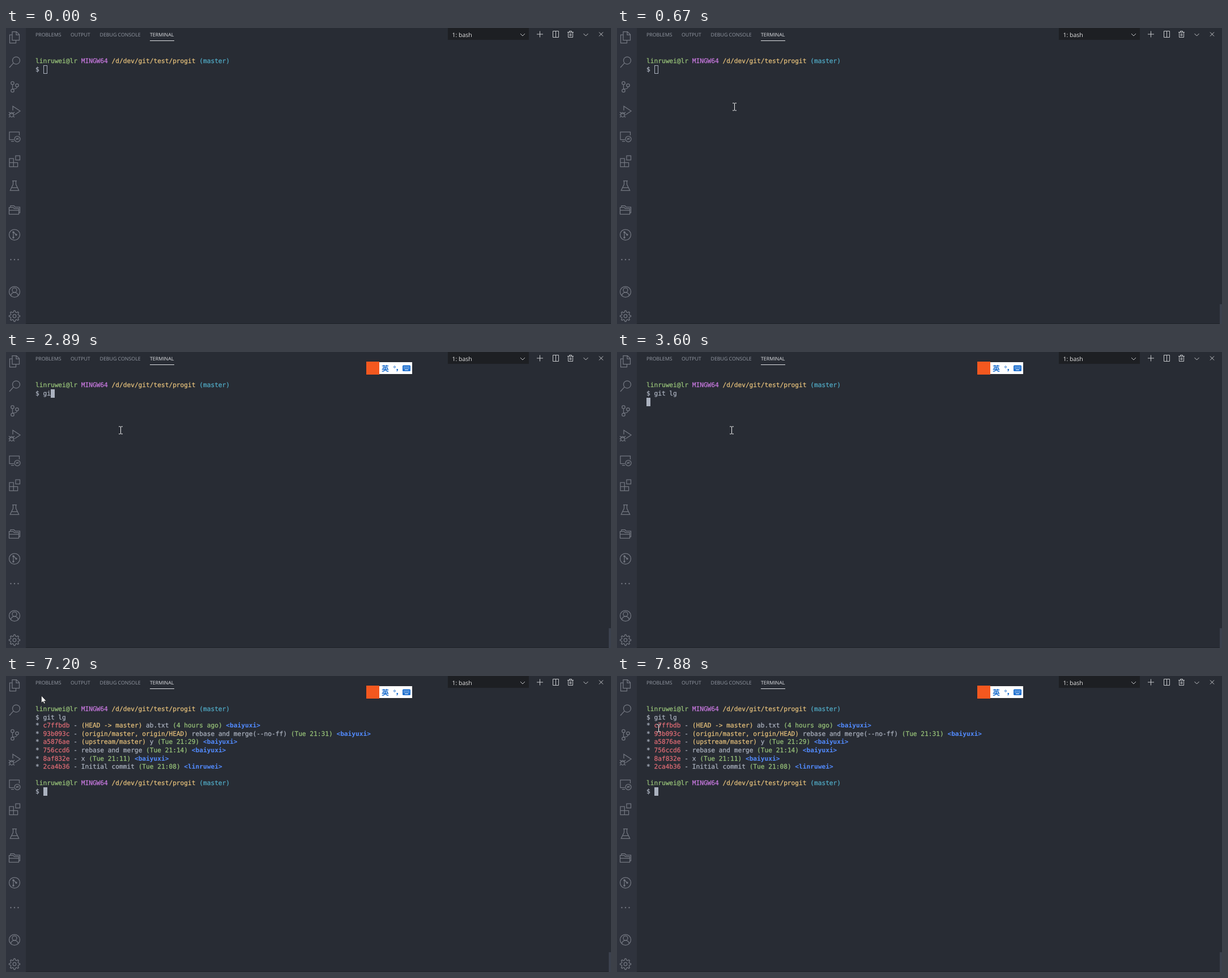
These frames come from a looping animation (1068 by 524 pixels, 8000 ms). An HTML page:

```html
<!DOCTYPE html>
<html lang="en">
<head>
<meta charset="utf-8">
<title>Terminal</title>
<style>
  html, body { margin: 0; width: 100%; height: 100%; overflow: hidden; background: #282c34; }
  svg { display: block; }
  text { white-space: pre; text-rendering: geometricPrecision; }
  .ui { font: 8.8px "Open Sans", sans-serif; fill: #949aa4; }
  .mono { font: 11.18px "DejaVu Sans Mono", monospace; color: #abb2bf; }
  .mono text, .mono tspan { fill: currentColor; stroke: currentColor; stroke-width: .25; }
  .mono .green { color: #98c379; }
  .mono .magenta { color: #c678dd; }
  .mono .yellow { color: #e5c07b; }
  .mono .cyan { color: #52adc8; }
  .mono .red { color: #e06c75; }
  .mono .blue { color: #528bff; font-weight: bold; stroke: none; }
  .line { fill: none; stroke-width: 1.25; }
  .thin { fill: none; stroke-width: 1; }
</style>
</head>
<body>
<svg width="1068" height="524" viewBox="0 0 1068 524">
  <rect width="1068" height="524" fill="#282c34"/>
  <rect width="35" height="524" fill="#2f333d"/>
  <rect x="35" y="523" width="1033" height="1" fill="#21252b"/>

  <g class="line" stroke="#737781">
    <path d="M11 6.5h7.5l5 5v10H11zM18 7v5h5M11 12H6.5v14.5h11v-5"/>
    <path d="M13.3 61.8L6 70"/><circle cx="18" cy="57.5" r="6.5"/>
    <path d="M11.5 100.2v8.1M19.5 104.2c0 3.2-3 3.5-8 4"/>
    <circle cx="11.5" cy="97.5" r="2.7"/><circle cx="11.5" cy="111" r="2.7"/><circle cx="19.5" cy="101.5" r="2.7"/>
    <path d="M12 146v-7.5l13 8.5-9 6M5 149l2.5 2M15 149l-2.5 2M4.5 153.5h2M13.5 153.5h2M5 158l2.5-2M15 158l-2.5-2M7 151.5h6"/>
    <ellipse cx="10" cy="153.5" rx="3.3" ry="4"/>
    <path d="M14 197.5H6V184h17.5v6M9 200.5h5M18 195l1.5 1.5-1.5 1.5M22 194.5l-1.5 1.5 1.5 1.5"/>
    <circle cx="20" cy="196.5" r="5"/>
    <path d="M6 231h7.3v7.3h7.3v7.2H6zM6 238.3h7.3v7.2M17 226h7.5v7.5H17z"/>
    <path d="M11 270.5h8M12.5 271v6L7.3 287.5h15.4L17.5 277v-6M10 282.5h10"/>
    <path d="M5.5 329.5v-12h7l2 2h8v10zM8 317v-2.5h6l2 2.5h8.5v10h-2M5.5 322.5h17"/>
    <circle cx="15" cy="366" r="9.5"/><path d="M13 361v10M13 361l5 5"/>
    <circle cx="15" cy="467" r="9.5"/><circle cx="15" cy="464" r="4"/>
    <path d="M8.5 473.5c1-4 3.5-5.5 6.5-5.5s5.5 1.5 6.5 5.5"/>
    <path id="gear"/><circle cx="15" cy="510" r="2.8"/>
  </g>
  <g fill="#737781">
    <circle cx="13" cy="361.5" r="1.7"/><circle cx="13" cy="371" r="1.7"/><circle cx="18" cy="366" r="1.7"/>
    <circle cx="8.5" cy="410" r="1.2"/><circle cx="15" cy="410" r="1.2"/><circle cx="21.5" cy="410" r="1.2"/>
  </g>

  <g class="ui">
    <text x="52" y="15">PROBLEMS</text>
    <text x="114" y="15">OUTPUT</text>
    <text x="165.5" y="15">DEBUG CONSOLE</text>
    <text x="254" y="15" fill="#e0e2e6">TERMINAL</text>
  </g>
  <rect x="254" y="22" width="43" height="1" fill="#e0e2e6"/>
  <rect x="780" width="143" height="21" fill="#1d1f23"/>
  <text x="787.5" y="16" style="font: 10.5px 'Open Sans', sans-serif" fill="#e4e4e4">1: bash</text>
  <g class="thin" stroke="#c5c7ca">
    <path d="M908 10l4 4 4-4M1019.5 10l4 4 4-4M942.5 5.5v11M937 11h11M1047 7.5l7 7M1054 7.5l-7 7"/>
    <path d="M965.5 5.5h10v11h-10zM970.5 5.5v11M991 7.5h11M994.5 7V5.500h4V7M992.5 8v8.5h8V8M995.5 9.5v5M997.5 9.5v5"/>
  </g>
  <rect id="scrollbar" x="1064" y="489" width="4" height="35" fill="#3b414d"/>

  <g class="mono" id="screen">
    <rect id="block" width="6" height="14" stroke="#abb2bf"/>
    <text id="typed"></text>
    <g id="output"></g>
  </g>

  <g id="ime">
    <rect x="648" y="18" width="69" height="21" fill="#fff"/>
    <rect x="636" y="17" width="23" height="23" fill="#f4581f"/>
    <text x="663" y="33.5" style="font: bold 13px 'Noto Sans CJK SC', 'Noto Sans CJK', sans-serif" fill="#1d6fcf">英</text>
    <circle cx="686" cy="26.5" r="1.5" fill="none" stroke="#1d6fcf"/>
    <path d="M689.5 30h2.5v2l-1.5 2.5h-1l.7-2.3h-.7z" fill="#1d6fcf"/>
    <rect x="700" y="23.5" width="14" height="10.5" rx="1.5" fill="#1d6fcf"/>
    <path d="M702 26.5h10M702 29h10" stroke="#fff" stroke-dasharray="1.2 1"/>
    <path d="M704 31.5h6" stroke="#fff"/>
  </g>

  <path id="beam" fill="none" stroke="#f0f0f0" d="M-3.5-6.5H-1l1 .5 1-.5h2.5M0-6V6M-3.5 6.5H-1l1-.5 1 .5h2.5"/>
  <path id="arrow" fill="#fff" stroke="#111" stroke-width=".6" d="M62.5 35v12.5l2.9-2.7 1.9 4.3 1.9-.9-1.9-4h3.9z"/>
</svg>
<script>
const $ = id => document.getElementById(id);
const CHAR = 6.73, LEFT = 52;
const rowTop = row => 51.6 + 14.57 * row;
const span = (color, text) =>
  `<tspan class="${color}">${text.replace(/</g, "&lt;").replace(/>/g, "&gt;")}</tspan>`;
const line = (row, content) => `<text x="${LEFT}" y="${rowTop(row) + 10.5}">${content}</text>`;
const prompt = row => line(row,
  span("green", "linruwei@lr ") + span("magenta", "MINGW64 ") +
  span("yellow", "/d/dev/git/test/progit ") + span("cyan", "(master)")) + line(row + 1, "$");

const commits = [
  ["c7ffbdb", "(HEAD -> master) ", "ab.txt", "4 hours ago", "baiyuxi"],
  ["93b093c", "(origin/master, origin/HEAD) ", "rebase and merge(--no-ff)", "Tue 21:31", "baiyuxi"],
  ["a5876ae", "(upstream/master) ", "y", "Tue 21:29", "baiyuxi"],
  ["756ccd6", "", "rebase and merge", "Tue 21:14", "baiyuxi"],
  ["8af832e", "", "x", "Tue 21:11", "baiyuxi"],
  ["2ca4b36", "", "Initial commit", "Tue 21:08", "linruwei"],
];
$("output").innerHTML = commits.map(([hash, refs, message, date, author], i) => line(i + 2,
  "* " + span("red", hash) + " - " + span("yellow", refs) + message + " " +
  span("green", `(${date}) `) + span("blue", `<${author}>`))).join("") + prompt(9);
$("screen").insertAdjacentHTML("afterbegin", prompt(0));
$("typed").setAttribute("x", LEFT + 2 * CHAR);
$("typed").setAttribute("y", rowTop(1) + 10.5);

$("gear").setAttribute("d", "M" + Array.from({ length: 32 }, (_, i) => {
  const angle = (i - 0.5) * Math.PI / 16, radius = i % 4 < 2 ? 9.6 : 7;
  return [15 + radius * Math.cos(angle), 510 + radius * Math.sin(angle)].map(v => v.toFixed(2));
}).join("L") + "z");

// Each step: start time, value
const beamSteps = [[0, null], [310, [357.5, 227.5]], [670, [207.5, 139.5]],
  [1860, [202.5, 138.5]], [7200, null], [7540, [91.5, 81.5]], [7880, [73.5, 92.5]]];
const typedSteps = [[0, 0], [2890, 2], [3240, 5], [3600, 6]];
const blockSteps = [[0, [2, 1]], [2890, [4, 1]], [3240, [7, 1]], [3600, [0, 2]], [5130, [2, 10]]];
const valueAt = (steps, t) => steps.filter(([start]) => start <= t).pop()[1];
const show = (id, visible) => $(id).setAttribute("visibility", visible ? "visible" : "hidden");

function draw() {
  const t = performance.now() % 8000;
  const beam = valueAt(beamSteps, t);
  show("beam", beam);
  if (beam) $("beam").setAttribute("transform", `translate(${beam})`);
  show("arrow", t >= 7200 && t < 7540);
  show("scrollbar", t >= 310);
  show("ime", t >= 1860);
  show("output", t >= 5130);
  $("typed").textContent = "git lg".slice(0, valueAt(typedSteps, t));
  const [col, row] = valueAt(blockSteps, t);
  $("block").setAttribute("x", Math.ceil(LEFT + col * CHAR) + 0.5);
  $("block").setAttribute("y", Math.round(rowTop(row)) + 0.5);
  $("block").setAttribute("fill", t < 1860 ? "none" : "#abb2bf");
  requestAnimationFrame(draw);
}
draw();
</script>
</body>
</html>
```
